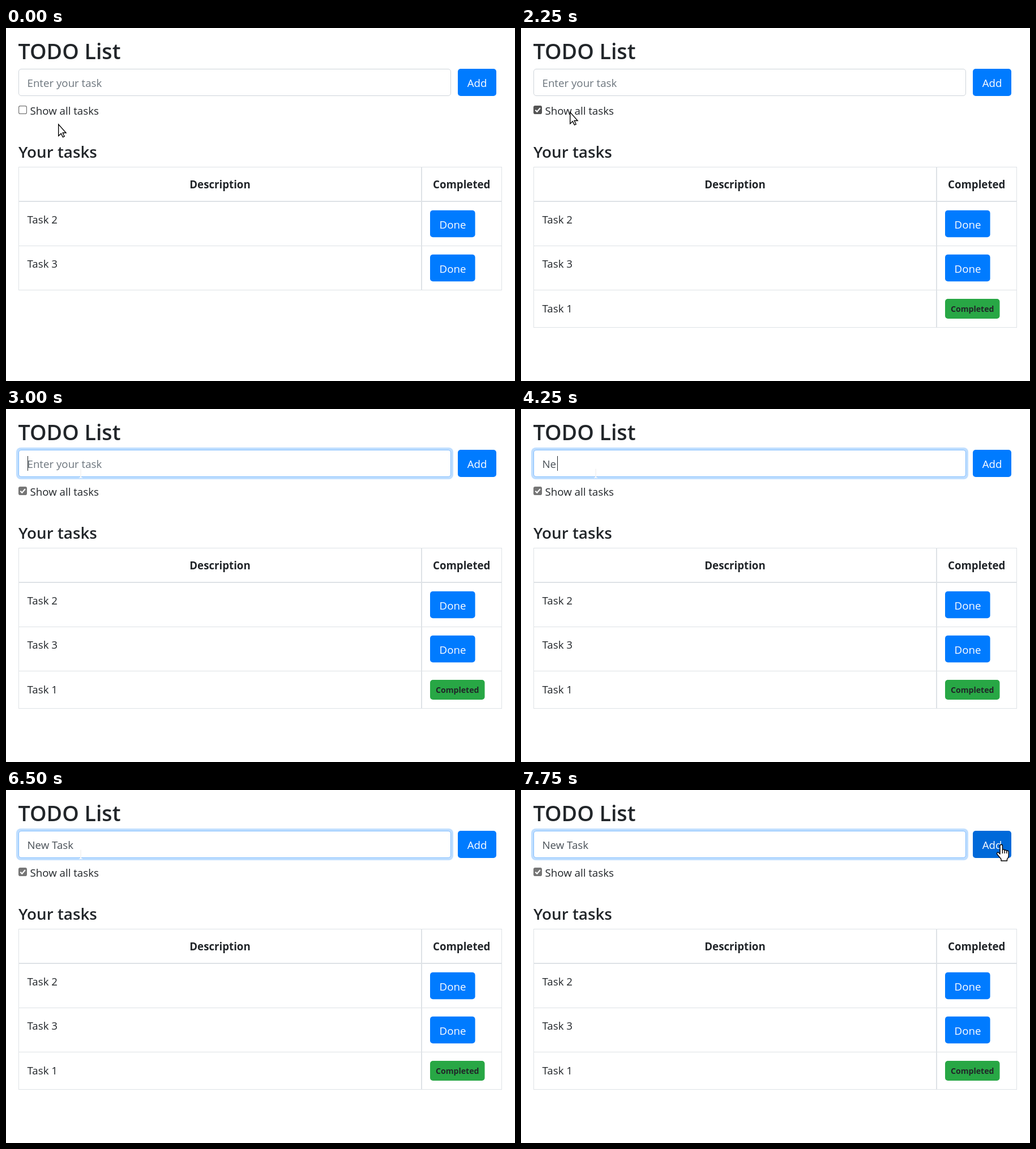
Animation of 899x623 px, one loop 8000 ms. Source, as an HTML page:

```html
<!DOCTYPE html>
<html lang="en">
<head>
<meta charset="utf-8">
<title>TODO List</title>
<style>
  html, body { margin: 0; width: 100%; height: 100%; overflow: hidden; background: #fff; }
  svg { display: block; width: 899px; height: 623px; }
  text { font: 18.7px "Open Sans", "Noto Sans", sans-serif; fill: #212529; white-space: pre; }
  .title { font-size: 37.6px; font-weight: 600; }
  .sub { font-size: 27.8px; font-weight: 600; }
  .bold { font-weight: 700; }
  .badge { font-size: 14.1px; font-weight: 700; }
  .light { fill: #fff; }
  .mid { text-anchor: middle; }
  .line { fill: #dee2e6; }
  .blue { fill: #007bff; }
</style>
</head>
<body>
<svg viewBox="0 0 899 623">
  <text class="title" x="21.5" y="54.5">TODO List</text>

  <rect id="glow" x="18" y="68" width="772" height="56" rx="8" fill="#bfdeff"/>
  <rect id="field" x="22.5" y="72.5" width="763" height="47" rx="4.5" fill="#fff"/>
  <text id="value" x="37.5" y="104"></text>
  <rect id="caret" y="83" width="1" height="26" fill="#212529"/>
  <rect id="add" x="798" y="72" width="68" height="48" rx="5"/>
  <text class="light mid" x="832" y="104">Add</text>

  <rect id="box" x="22.6" y="137.6" width="13.8" height="13.8" rx="2.5" stroke-width="1.25"/>
  <path id="tick" d="M25.3 144.7l3 3 5.6-6.4" fill="none" stroke="#fff" stroke-width="2.2"/>
  <text x="42.5" y="152.5">Show all tasks</text>

  <text class="sub" x="22" y="228.5">Your tasks</text>
  <g id="table"></g>
  <g id="extra"></g>

  <g id="arrow" fill="#fff" stroke="#000" stroke-width="1.4">
    <path d="M.7 1V21.5L5.3 17.2 8.4 23.6 11.2 22.3 8.2 16H14Z"/>
  </g>
  <g id="beam" fill="none" stroke-width="1.2">
    <path stroke="#e6e6e6" stroke-width="2.2" d="M0 1V17"/>
    <path stroke="#fff" d="M-3 .5H-1L0 1.5 1 .5H3M0 1.5V16.5M-3 17.5H-1L0 16.5 1 17.5H3"/>
  </g>
  <g id="hand" fill="#fff" stroke="#000" stroke-width="1.4" stroke-linejoin="round">
    <path d="M-4 2.5a2.2 2.2 0 0 1 4.4 0V10a2 2 0 0 1 3.8 .8a2 2 0 0 1 3.6 1a1.9 1.9 0 0 1 3.4 1.2V20Q11 24 8.5 26V29H-2V26Q-5 22-9 17.5a2 2 0 0 1 2.6-3L-4 17Z"/>
    <path fill="none" d="M.4 10V16M4.2 11V16M7.8 12V16"/>
  </g>
</svg>
<script>
const LOOP = 8000;
const $ = id => document.getElementById(id);
const set = (id, attrs) => { for (const k in attrs) $(id).setAttribute(k, attrs[k]); };
const show = (id, on) => set(id, { display: on ? "inline" : "none" });

const line = (x, y, w, h) => `<rect class="line" x="${x}" y="${y}" width="${w}" height="${h}"/>`;
const label = (x, y, s, c = "") => `<text class="${c}" x="${x}" y="${y}">${s}</text>`;

// Side borders, column rule and bottom rule of one table row
const frame = (top, bottom) =>
  line(22, top, 1, bottom - top) + line(733, top, 2, bottom - top) +
  line(875, top, 1, bottom - top) + line(22, bottom, 854, 1);

const openRow = (top, name) =>
  frame(top, top + 78) + label(37.5, top + 39, name) +
  `<rect class="blue" x="749" y="${top + 15.7}" width="79.6" height="47.6" rx="5"/>` +
  label(789, top + 48, "Done", "light mid");

$("table").innerHTML =
  line(22, 245, 854, 1) + frame(245, 305) + line(22, 306, 854, 1) +
  label(378, 283, "Description", "bold mid") + label(804.7, 283, "Completed", "bold mid") +
  openRow(306, "Task 2") + openRow(384.5 - .5, "Task 3");
$("extra").innerHTML =
  frame(462, 528) + label(37.5, 501.5, "Task 1") +
  `<rect x="749" y="478" width="96.5" height="35" rx="5" fill="#28a745"/>` +
  label(797.2, 501, "Completed", "badge mid");

// Time, pointer shape, x, y
const pointer = [
  [0, "arrow", 92, 169], [250, "arrow", 90, 154], [500, "arrow", 89, 149],
  [750, "arrow", 86, 147.5], [2500, "arrow", 107, 133], [2750, "beam", 132, 104],
  [7000, "beam", 207, 87], [7250, "arrow", 579, 63.5], [7500, "arrow", 822, 63],
  [7750, "hand", 850, 96]
];
// Time, typed text, caret x (0 while blinked off)
const typing = [
  [0, "", 0], [3000, "", 38], [3500, "", 0], [3750, "N", 53], [4250, "Ne", 64],
  [4750, "New ", 83], [5250, "New ", 0], [5500, "New Ta", 100], [5750, "New Ta", 0],
  [6000, "New Tas", 110], [6500, "New Task", 0], [7000, "New Task", 119], [7500, "New Task", 0]
];
const at = (track, t) => track.filter(k => k[0] <= t).pop();

function draw(t) {
  const [, shape, x, y] = at(pointer, t);
  for (const id of ["arrow", "beam", "hand"]) show(id, id === shape);
  set(shape, { transform: `translate(${x} ${y})` });

  const [, text, caretX] = at(typing, t);
  const focus = t >= 3000;
  $("value").textContent = text || "Enter your task";
  $("value").style.fill = text ? "#495057" : "#6c757d";
  show("caret", caretX > 0);
  set("caret", { x: caretX });
  show("glow", focus);
  set("field", { stroke: focus ? "#80bdff" : "#ced4da" });
  set("add", { fill: t >= 7750 ? "#0069d9" : "#007bff" });

  const checked = t >= 2250;
  const tone = t >= 250 && t < 2750 ? "#555" : "#767676";
  set("box", { stroke: tone, fill: checked ? tone : "#fff" });
  show("tick", checked);
  show("extra", checked);
}

const start = performance.now();
function tick() {
  draw((performance.now() - start) % LOOP);
  requestAnimationFrame(tick);
}
draw(0);
requestAnimationFrame(tick);
</script>
</body>
</html>
```
